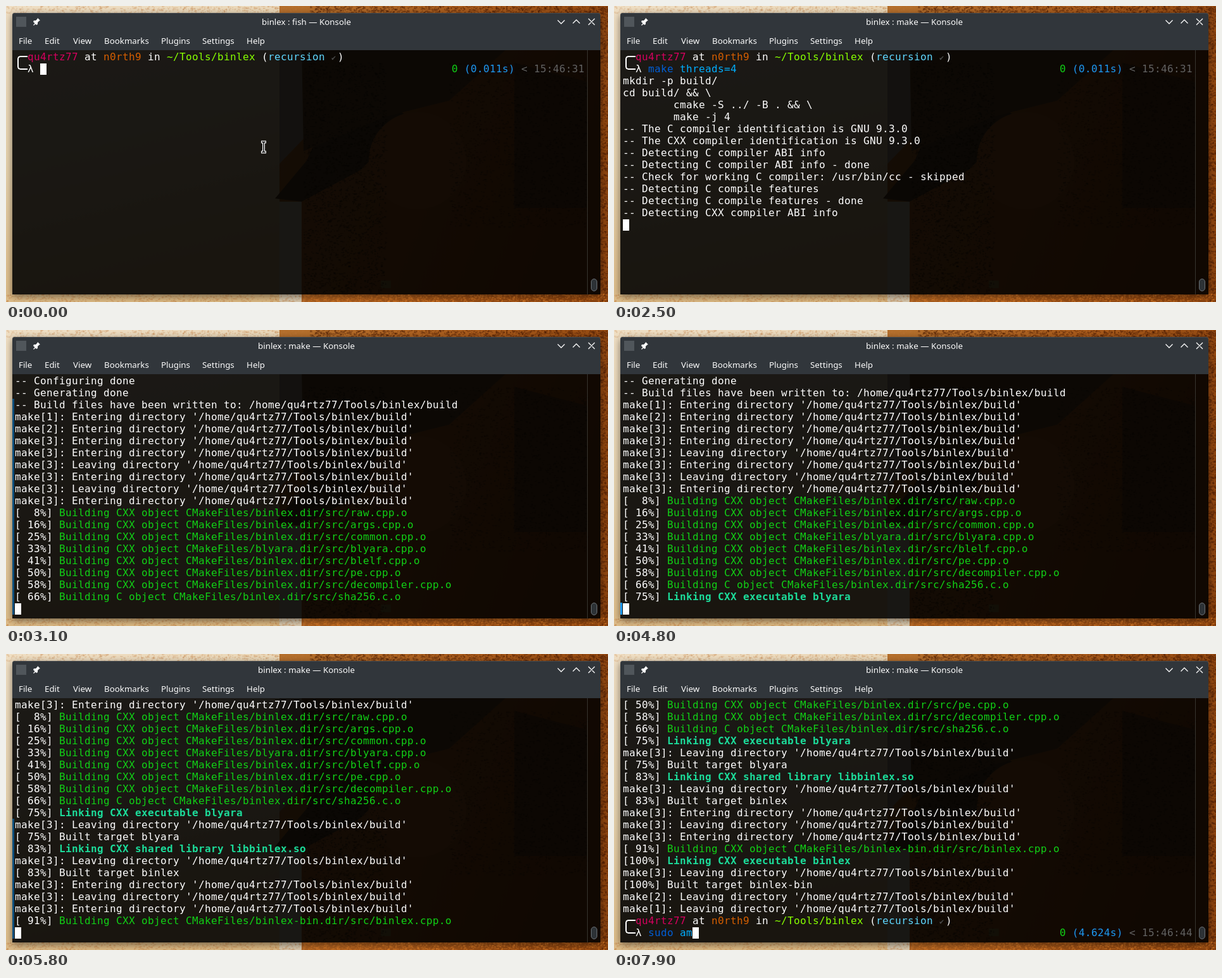
An HTML page with a canvas for the animation above (8000 ms loop, 951x469 px).

```html
<!DOCTYPE html>
<html lang="en">
<head>
<meta charset="utf-8">
<title>Terminal build</title>
<style>
html, body { margin: 0; width: 100%; height: 100%; overflow: hidden; background: #000; }
#stage { position: relative; width: 951px; height: 469px; overflow: hidden; }
#stage > *, #term > * { position: absolute; }
#shadow { left: 10px; top: 11px; width: 929px; height: 446px; border-radius: 4px 4px 0 0; box-shadow: 0 3px 12px rgba(0,0,0,.5); }
#bar { left: 10px; top: 11px; width: 929px; height: 59px; border-radius: 4px 4px 0 0; background: #31363b;
  box-shadow: inset 0 1px #454a4f; font: 13.33px/20px "Noto Sans", sans-serif; color: #fcfcfc; }
#bar span { position: absolute; top: 34px; white-space: pre; }
#bar #title { top: 4px; left: 0; width: 100%; text-align: center; }
#term { left: 10px; top: 70px; width: 929px; height: 387px; background: rgba(0,0,0,.885); }
#rows { left: 14px; top: 71px; font: 16px/19px "DejaVu Sans Mono", monospace; color: #fff; white-space: pre; }
#rows div { position: relative; width: 900px; height: 19px; }
#rows .right { position: absolute; left: 690px; }
#rows .bracket { position: absolute; left: 4px; top: 8px; width: 14px; height: 18px; border: solid #fff; border-width: 2px 0 2px 2px; border-radius: 5px 0 0 5px; }
#rows .tick { display: inline-block; width: 10px; font-size: 12px; line-height: 12px; letter-spacing: 0; color: #4a4a4a; }
#rows #cursor { position: absolute; width: 10px; height: 18px; line-height: 17px; background: #fff; color: #111; }
#mark { left: 10px; width: 3px; }
svg { left: 0; top: 0; }
</style>
</head>
<body>
<div id="stage">
  <canvas id="wall" width="951" height="469"></canvas>
  <div id="shadow"></div>
  <div id="bar"><span id="title"></span></div>
  <div id="term"></div>
  <div id="mark"></div>
  <div id="rows"></div>
  <svg width="951" height="469" fill="none" stroke="#fcfcfc" stroke-width="1.3">
    <rect x="16" y="17" width="16" height="16" fill="#50565b" stroke="none"/>
    <path d="M50 19l4 4-1.5.5-2.5 2.5v3l-2 1-5-5 1-2h3l2.500-2.500z" fill="#fcfcfc" stroke="none"/>
    <path d="M43.500 30.500l3-3M871.500 22.500l5.500 5.500 5.500-5.500M895.500 27.500l5.500-5.500 5.500 5.500M920 20l10 10m0-10l-10 10"/>
    <path d="M918.500 70v387" stroke="#37342f" stroke-width="1"/>
    <rect x="924.500" y="432.500" width="9" height="19" rx="4.500" fill="#2d3236" stroke="#6b7074" stroke-width="1"/>
    <g id="mouse">
      <path d="M403 215.500h8M403 231.500h8M407 215.500v16" stroke="#fff" stroke-width="4"/>
      <path d="M404 215.500h6M404 231.500h6M407 215.500v16" stroke="#000" stroke-width="1.500"/>
    </g>
  </svg>
</div>
<script>
const $ = id => document.getElementById(id);
const LOOP = 8000, ROW = 19, COL = 10, VISIBLE = 20;
const USER = 'qu4rtz77', HOST = 'n0rth9';

// wallpaper
function paintWall() {
  const g = $('wall').getContext('2d');
  let seed = 7;
  const rnd = () => (seed = seed * 16807 % 2147483647) / 2147483647;
  const shape = (color, ...p) => {
    g.fillStyle = color;
    g.beginPath();
    for (let i = 0; i < p.length; i += 2) g.lineTo(p[i], p[i + 1]);
    g.fill();
  };
  const ramp = (x0, y0, x1, y1, ...colors) => {
    const r = g.createLinearGradient(x0, y0, x1, y1);
    colors.forEach((c, i) => r.addColorStop(i / (colors.length - 1), c));
    return r;
  };
  const specks = (n, x, y, w, h, color) => {
    g.fillStyle = color;
    while (n--) g.fillRect(x + rnd() * w | 0, y + rnd() * h | 0, 1 + rnd() * 3, 1 + rnd() * 2);
  };
  g.fillStyle = ramp(0, 0, 120, 469, '#f0dfc4', '#e6d2ae', '#dcb983');
  g.fillRect(0, 0, 470, 469);
  g.fillStyle = ramp(470, 0, 951, 200, '#b56f2c', '#a85a1b', '#8e450f');
  g.fillRect(432, 0, 519, 469);
  shape('#d8c8ad', 432, 310, 467, 310, 467, 469, 432, 469);
  shape('#a99a83', 432, 60, 520, 60, 480, 200, 432, 250);
  shape('#57401f', 540, 100, 640, 180, 560, 260, 467, 310, 425, 305, 475, 245);
  shape('#6b4a24', 467, 60, 800, 60, 700, 150, 600, 175, 470, 230);
  g.fillStyle = '#ad6226';
  g.beginPath();
  g.arc(650, 245, 77, 0, 7);
  g.fill();
  shape('#683d18', 803, 90, 918, 120, 918, 320, 803, 320);
  shape('#a3803b', 592, 435, 608, 435, 608, 447, 592, 447);
  specks(2600, 470, 90, 130, 367, 'rgba(20,10,0,.3)');
  specks(1800, 700, 90, 218, 260, 'rgba(20,10,0,.25)');
  specks(900, 480, 0, 471, 12, 'rgba(70,25,0,.3)');
  specks(900, 938, 0, 13, 469, 'rgba(70,25,0,.3)');
  specks(900, 470, 456, 481, 13, 'rgba(225,130,45,.3)');
  specks(500, 0, 0, 470, 12, 'rgba(190,120,60,.2)');
  specks(500, 0, 456, 470, 13, 'rgba(190,120,60,.25)');
}

// terminal text
const ink = (color, s) => `<span style="color:${color}">${s}</span>`;
const dir = (n, verb) => `make[${n}]: ${verb} directory '/home/${USER}/Tools/binlex/build'`;
const enter = dir(3, 'Entering'), leave = dir(3, 'Leaving');
const pct = (n, s) => `[${String(n).padStart(3)}%] ${s}`;
const build = (n, file, target = 'binlex') =>
  pct(n, ink('#11d116', `Building ${file.endsWith('.c') ? 'C' : 'CXX'} object CMakeFiles/${target}.dir/src/${file}.o`));
const link = (n, s) => pct(n, `<b>${ink('#1cdc9a', 'Linking CXX ' + s)}</b>`);
const prompt = `<i class="bracket"></i>  ${ink('#d7005f', USER)} at ${ink('#d75f00', HOST)} in ` +
  `${ink('#87ff00', '~/Tools/binlex')} (${ink('#5fd7ff', 'recursion')} <span class="tick">✔</span>)`;
const detect = lang => [
  `-- Detecting ${lang} compiler ABI info`,
  `-- Detecting ${lang} compiler ABI info - done`,
  `-- Check for working ${lang} compiler: /usr/bin/${lang === 'C' ? 'cc' : 'c++'} - skipped`,
  `-- Detecting ${lang} compile features`,
  `-- Detecting ${lang} compile features - done`
];

const FIRST = 1, SECOND = 53;   // rows that take typed input
const lines = [
  prompt, '',
  'mkdir -p build/', 'cd build/ &amp;&amp; \\',
  '        cmake -S ../ -B . &amp;&amp; \\', '        make -j 4',
  '-- The C compiler identification is GNU 9.3.0',
  '-- The CXX compiler identification is GNU 9.3.0',
  ...detect('C'), ...detect('CXX'),
  '-- Configuring done', '-- Generating done',
  `-- Build files have been written to: /home/${USER}/Tools/binlex/build`,
  dir(1, 'Entering'), dir(2, 'Entering'),
  enter, enter, leave, enter, leave, enter,
  build(8, 'raw.cpp'), build(16, 'args.cpp'), build(25, 'common.cpp'),
  build(33, 'blyara.cpp', 'blyara'), build(41, 'blelf.cpp'), build(50, 'pe.cpp'),
  build(58, 'decompiler.cpp'), build(66, 'sha256.c'),
  link(75, 'executable blyara'), leave, pct(75, 'Built target blyara'),
  link(83, 'shared library libbinlex.so'), leave, pct(83, 'Built target binlex'),
  enter, leave, enter,
  build(91, 'binlex.cpp', 'binlex-bin'),
  link(100, 'executable binlex'), leave, pct(100, 'Built target binlex-bin'),
  dir(2, 'Leaving'), dir(1, 'Leaving'),
  prompt, ''
];

// [time, row of the cursor]
const output = [[0, 1], [2100, 6], [2200, 7], [2400, 9], [2500, 14], [2600, 18], [2700, 33], [2800, 37],
  [4800, 38], [5000, 40], [5200, 41], [5400, 46], [5500, 47], [6600, 48], [6700, 49], [6800, 53]];
// [time, typed characters]
const keys1 = [[0, 0], [500, 1], [600, 2], [700, 4], [800, 5], [900, 6], [1000, 8], [1100, 11], [1200, 14]];
const keys2 = [[0, 0], [7300, 1], [7400, 3], [7500, 4], [7700, 5], [7800, 6], [7900, 7]];
// [start, scroll offset before the burst, time the mark dims]
const bursts = [[0, 0, 3100], [4800, 18, 5200], [6600, 28, 7100]];
const at = (list, t) => list.filter(e => e[0] <= t).pop();

function command(text, n, hint, status) {
  const typed = text.slice(0, n);
  return `  λ ${ink(n < 4 ? '#ff0000' : '#005fd7', typed.slice(0, 4))}${ink('#00afff', typed.slice(4))}` +
    ink('#555', hint.slice(n)) +
    `<span class="right">${ink('#11d116', 0)} ${ink('#1d99f3', `(${status[0]})`)} ${ink('#626262', '&lt; ' + status[1])}</span>`;
}

function draw(t) {
  const row = at(output, t)[1], top = Math.max(0, row - VISIBLE + 1);
  const n1 = at(keys1, t)[1], n2 = at(keys2, t)[1];
  const hint1 = n1 && t < 2100 ? 'make threads=4' : '';
  const hint2 = n2 > 6 || !n2 ? '' : n2 > 5 ? 'sudo apt-get install cmake' : 'sudo make install';
  lines[FIRST] = command('make threads=4', n1, hint1, ['0.011s', '15:46:31']);
  lines[SECOND] = command('sudo am', n2, hint2, ['4.624s', '15:46:44']);

  const [col, under] = row === FIRST ? [4 + n1, hint1[n1]] : row === SECOND ? [4 + n2, hint2[n2]] : [0, ''];
  const shown = lines.slice(top, row === FIRST || row === SECOND ? row + 1 : row);
  $('rows').innerHTML = shown.map(s => `<div>${s}</div>`).join('') +
    `<div id="cursor" style="left:${col * COL}px;top:${(row - top) * ROW + 1}px">${under || ''}</div>`;

  const [, base, dim] = at(bursts, t);
  const fresh = t < 7300 ? top - base : 0;
  $('mark').style.cssText = `top:${451 - fresh * ROW}px;height:${fresh * ROW}px;background:${t < dim ? '#1d99f3' : '#0e4f7d'}`;
  $('title').textContent = `binlex : ${t < 2400 ? 'fish' : 'make'} — Konsole`;
  $('mouse').style.display = t < 500 ? '' : 'none';
}

// snap the monospace advance to the column grid
function fitColumns() {
  const rows = $('rows');
  rows.innerHTML = `<span>${'0'.repeat(50)}</span>`;
  rows.style.letterSpacing = COL - rows.firstChild.getBoundingClientRect().width / 50 + 'px';
}

const menu = { File: 20, Edit: 61, View: 106, Bookmarks: 155, Plugins: 245, Settings: 310, Help: 380 };
for (const name in menu)
  $('bar').insertAdjacentHTML('beforeend', `<span style="left:${menu[name] - 10}px">${name}</span>`);

paintWall();
fitColumns();
const start = performance.now();
let last = -1;
function frame() {
  const step = Math.floor((performance.now() - start) % LOOP / 100);
  if (step !== last) draw((last = step) * 100);
  requestAnimationFrame(frame);
}
frame();
</script>
</body>
</html>
```
